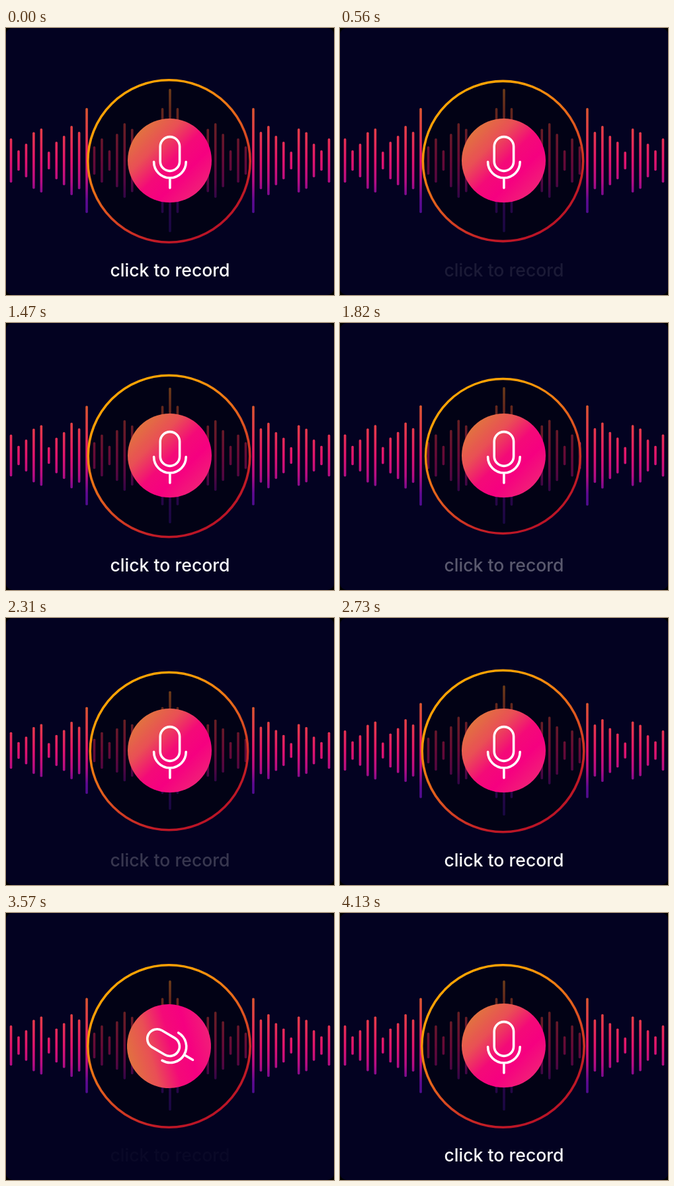
These frames come from a looping animation (496x404 px, 4.2 s). An HTML page:

```html
<!DOCTYPE html>
<html lang="en">
<head>
<meta charset="utf-8">
<title>Click to record</title>
<style>
  html, body { margin: 0; width: 100%; height: 100%; overflow: hidden; background: #000; }
  svg { display: block; width: 496px; height: 404px; }
  #label { font: 500 26.6px Inter, "Open Sans", sans-serif; fill: #fff; text-anchor: middle; }
</style>
</head>
<body>
<svg viewBox="0 0 496 404">
  <defs>
    <linearGradient id="barFill" gradientUnits="userSpaceOnUse" x1="0" y1="92" x2="0" y2="309">
      <stop offset="0" stop-color="#ec8428"/>
      <stop offset=".14" stop-color="#d9562f"/>
      <stop offset=".34" stop-color="#e5344f"/>
      <stop offset=".5" stop-color="#e2136c"/>
      <stop offset=".65" stop-color="#b40d84"/>
      <stop offset=".78" stop-color="#5f0a93"/>
      <stop offset="1" stop-color="#36108a"/>
    </linearGradient>
    <linearGradient id="ringFill" x1=".22" y1=".04" x2=".78" y2=".96">
      <stop offset="0" stop-color="#ffa602"/>
      <stop offset=".2" stop-color="#fb9a08"/>
      <stop offset=".55" stop-color="#de5520"/>
      <stop offset=".85" stop-color="#c01a26"/>
      <stop offset="1" stop-color="#b81226"/>
    </linearGradient>
    <linearGradient id="buttonFill" x1=".12" y1=".12" x2=".88" y2=".88">
      <stop offset="0" stop-color="#e0763d"/>
      <stop offset=".28" stop-color="#e94f55"/>
      <stop offset=".52" stop-color="#f40a78"/>
      <stop offset=".72" stop-color="#f60080"/>
      <stop offset="1" stop-color="#f02277"/>
    </linearGradient>
  </defs>

  <rect width="496" height="404" rx="10" fill="#030221"/>
  <g id="bars" fill="url(#barFill)"></g>
  <g id="ring">
    <circle cx="246.5" cy="201.5" r="122.7" fill="#03020c" fill-opacity=".55"/>
    <circle cx="246.5" cy="201.5" r="122.7" fill="none" stroke="url(#ringFill)" stroke-width="3.6"/>
  </g>
  <g id="button">
    <circle cx="247.5" cy="200.5" r="63.5" fill="url(#buttonFill)"/>
    <g fill="none" stroke="#fff" stroke-width="3.6" stroke-linecap="round">
      <rect x="233.2" y="164.6" width="29.4" height="51.8" rx="14.7"/>
      <path d="M223.6 202.5a24.3 24.3 0 0 0 48.6 0M247.9 227V242"/>
    </g>
  </g>
  <text id="label" x="248" y="376">click to record</text>
</svg>
<script>
  const LOOP = 4200, STEP = 70;
  const BEAT = 700, CALM = 2800;
  const WAVE = { start: 695, period: 355, end: 2700, depth: 0.177, rest: 0.907 };
  const SPIN = { start: 2800, length: 1050 };

  const get = id => document.getElementById(id);
  const bars = get("bars"), ring = get("ring"), button = get("button"), label = get("label");
  const swing = x => (1 - Math.cos(2 * Math.PI * x)) / 2;

  // Half heights from the centre outwards; both sides mirror each other.
  const halves = [108.5, 79.5, 50, 40, 30, 48, 56.5, 40.5, 15.5, 33.5, 21.5,
                  79.5, 43.5, 52.5, 37.5, 28.5, 13.5, 48.5, 43, 25.5, 15.5, 33.5];

  function addBar(x, half) {
    const bar = document.createElementNS("http://www.w3.org/2000/svg", "rect");
    const box = { x: x - 1.8, y: 200.5 - half, width: 3.6, height: half * 2, rx: 1.8 };
    for (const key in box) bar.setAttribute(key, box[key]);
    bars.append(bar);
  }
  halves.forEach((half, i) => {
    const offset = i * 11.45;
    addBar(248 - offset, half);
    if (i) addBar(248 + offset, half);
  });

  const scaleAt = (x, y, sx, sy) =>
    `translate(${x} ${y}) scale(${sx} ${sy}) translate(${-x} ${-y})`;

  function waveScale(t) {
    if (t < WAVE.start) return 1;
    if (t > WAVE.end) return WAVE.rest;
    return 1 - WAVE.depth * swing((t - WAVE.start) / WAVE.period);
  }

  function ringScale(t) {
    const beat = Math.abs(Math.cos(Math.PI * Math.min(t, CALM) / BEAT));
    return 1 - 0.068 * (1 - beat);
  }

  function spinAngle(t) {
    const p = Math.min(1, Math.max(0, (t - SPIN.start) / SPIN.length));
    return 360 * swing(p / 2);
  }

  function draw(t) {
    const r = ringScale(t);
    bars.setAttribute("transform", scaleAt(248, 200.5, 1, waveScale(t)));
    ring.setAttribute("transform", scaleAt(246.5, 201.5, r, r));
    button.setAttribute("transform", `rotate(${spinAngle(t)} 247.9 201.9)`);
    label.setAttribute("opacity", 1 - swing(t / 1400));
  }

  const begin = performance.now();
  function tick() {
    const t = (performance.now() - begin) % LOOP;
    draw(Math.floor(t / STEP) * STEP);
    requestAnimationFrame(tick);
  }
  tick();
</script>
</body>
</html>
```
